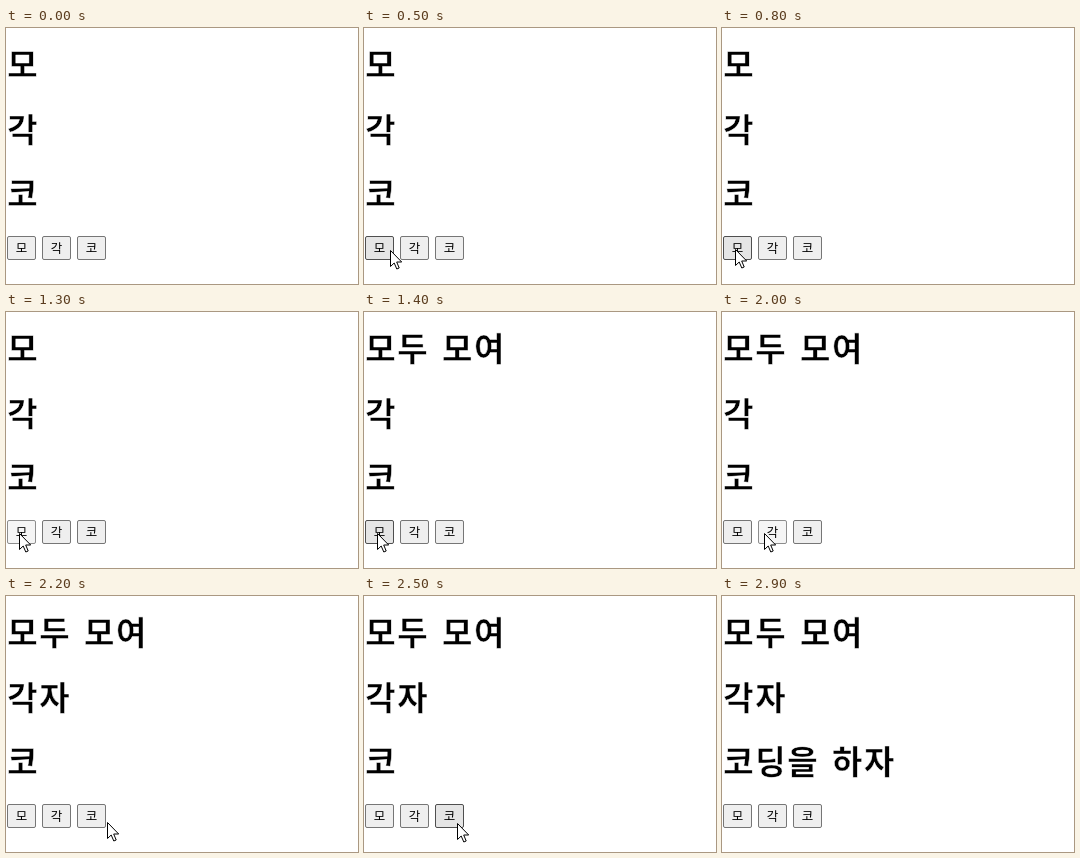
These frames come from a looping animation (352 px wide and 256 px high, 4.8 s). An HTML page:

```html
<!DOCTYPE html>
<html lang="ko">
<head>
<meta charset="utf-8">
<style>
  html, body { margin: 0; width: 100%; height: 100%; overflow: hidden; background: #fff; }
  svg { display: block; width: 352px; height: 256px; }
  text { font-family: "Noto Sans CJK KR", "Noto Sans CJK", sans-serif; }
  /* The white outline makes the bold strokes slightly thinner. */
  .title { font-size: 33px; font-weight: 700; letter-spacing: 1.6px; word-spacing: 2px; stroke: #fff; stroke-width: .5px; }
  .label { font-size: 12.5px; text-anchor: middle; }
</style>
</head>
<body>
<svg viewBox="0 0 352 256">
  <g id="page"></g>
  <path id="cursor" d="M.5 .5V16.5L4.2 13L6.8 19L9.2 18L6.7 12H11.7Z" fill="#fff" stroke="#000"/>
</svg>
<script>
const LOOP = 4800;
const STEP = 100;
const PRESS = 100;
const BUTTON = { y: 208, width: 29, height: 24, pitch: 35 };
const page = document.getElementById('page');
const cursor = document.getElementById('cursor');

// Each button expands its own heading at the given time.
const items = [
  { short: '모', full: '모두 모여', expandAt: 1400, showsPress: true },
  { short: '각', full: '각자', expandAt: 2100, showsPress: true },
  { short: '코', full: '코딩을 하자', expandAt: 2700 }
];

// The pointer enters at the bottom and glides from button to button.
const visit = { from: 200, until: 2900, start: { x: 107, y: 240 } };
const moves = [
  { from: 200, until: 700, x: 10, y: 219 },
  { from: 700, until: 800, x: 13, y: 221 },
  { from: 1500, until: 1900, x: 42, y: 221 },
  { from: 2100, until: 2200, x: 101, y: 226 },
  { from: 2300, until: 2400, x: 93, y: 227 }
];

const looks = {
  idle: ['#efefef', '#767676'],
  hover: ['#e5e5e5', '#4f4f4f'],
  active: ['#f5f5f5', '#8d8d8d']
};

const easeOut = p => 1 - (1 - p) ** 2;
const clamp = p => Math.min(1, Math.max(0, p));

function pointerAt(t) {
  let { x, y } = visit.start;
  for (const move of moves) {
    const p = easeOut(clamp((t - move.from) / (move.until - move.from)));
    x += (move.x - x) * p;
    y += (move.y - y) * p;
  }
  return { x: Math.round(x), y: Math.round(y) };
}

function add(tag, attributes, text = '') {
  const node = document.createElementNS('http://www.w3.org/2000/svg', tag);
  for (const name in attributes) node.setAttribute(name, attributes[name]);
  node.textContent = text;
  return page.appendChild(node);
}

items.forEach((item, i) => {
  item.x = 1 + BUTTON.pitch * i;
  item.title = add('text', { class: 'title', x: 1.3, y: 49 + 64.5 * i });
  item.box = add('rect', {
    x: item.x + .5, y: BUTTON.y + .5,
    width: BUTTON.width - 1, height: BUTTON.height - 1, rx: 1.5
  });
  add('text', { class: 'label', x: item.x + BUTTON.width / 2, y: 225 }, item.short);
});

function draw(t) {
  const visible = t >= visit.from && t < visit.until;
  const { x, y } = pointerAt(t);
  cursor.setAttribute('transform', `translate(${x} ${y})`);
  cursor.setAttribute('visibility', visible ? 'visible' : 'hidden');

  for (const item of items) {
    const over = visible && x >= item.x && x < item.x + BUTTON.width
      && y >= BUTTON.y && y < BUTTON.y + BUTTON.height;
    const expanded = t >= item.expandAt;
    const pressed = item.showsPress && !expanded && t >= item.expandAt - PRESS;
    const [fill, stroke] = looks[pressed ? 'active' : over ? 'hover' : 'idle'];
    item.box.setAttribute('fill', fill);
    item.box.setAttribute('stroke', stroke);
    item.title.textContent = expanded ? item.full : item.short;
  }
}

const start = performance.now();
function tick() {
  const t = (performance.now() - start) % LOOP;
  draw(Math.floor(t / STEP) * STEP);
  requestAnimationFrame(tick);
}
tick();
</script>
</body>
</html>
```
